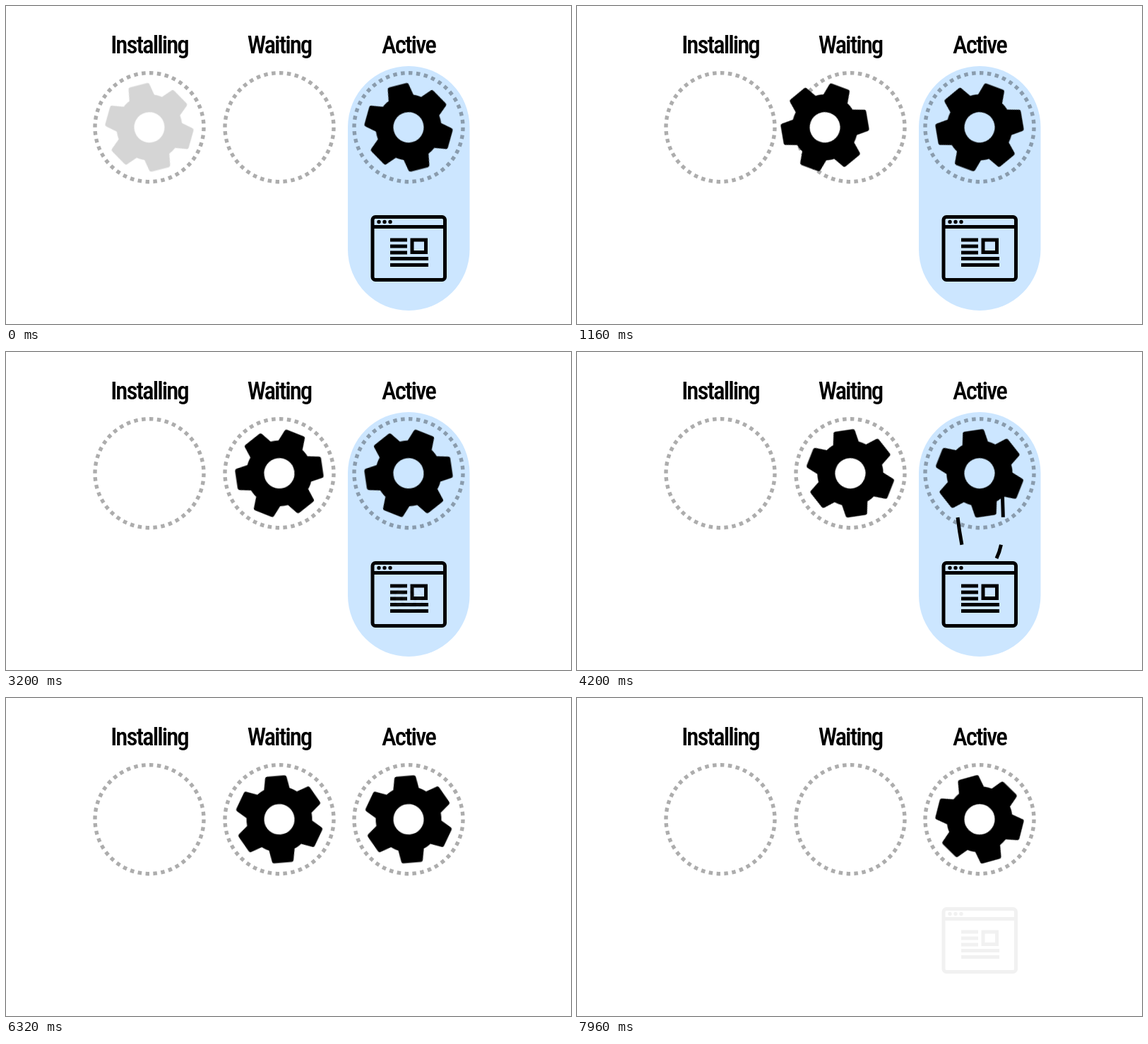
Animation, 800 px wide and 450 px high, one loop 8000 ms. Source, as an HTML page:

```html
<!DOCTYPE html>
<html lang="en">
<head>
<meta charset="utf-8">
<title>Worker lifecycle</title>
<style>
  html, body { margin: 0; width: 100%; height: 100%; overflow: hidden; background: #fff; }
  svg { display: block; width: 100vw; height: 100vh; }
  .label {
    font: 500 35px 'Roboto Condensed', 'Open Sans Condensed', Roboto, sans-serif;
    font-stretch: condensed;
    letter-spacing: -2px;
    text-anchor: middle;
  }
  .slot { fill: none; stroke: #000; stroke-opacity: .32; stroke-width: 5.4; stroke-dasharray: 1; }
  .line { fill: none; stroke: #000; stroke-width: 5; }
</style>
</head>
<body>
<svg viewBox="0 0 800 450">
  <defs>
    <path id="tooth" d="M-16 -38L-12.3 -58.4H12.3L16 -38Z" stroke="#000" stroke-width="6" stroke-linejoin="round"/>
    <g id="gear"><circle r="34" fill="none" stroke="#000" stroke-width="25"/></g>
    <circle id="slot" class="slot" r="77" pathLength="88"/>
  </defs>

  <rect id="pill" x="484" y="85" width="172.5" height="346" rx="86.25" fill="#cce6ff"/>

  <g id="columns"></g>

  <path id="fetch" class="line" d="M549 292Q536 236 535 172A35 35 0 0 1 605 172C597 205 612 255 594 292"/>

  <g id="page">
    <g id="pageArt" class="line">
      <rect x="519" y="298.5" width="102.5" height="89" rx="4"/>
      <path d="M519 312.5H621"/>
      <path d="M544 331H568M544 340H568M544 349H568M544 357.5H598M544 366.5H598"/>
      <rect x="575" y="331" width="19.5" height="17.5"/>
      <g fill="#000" stroke="none">
        <circle cx="528" cy="305.5" r="2.7"/>
        <circle cx="536" cy="305.5" r="2.7"/>
        <circle cx="544" cy="305.5" r="2.7"/>
      </g>
    </g>
    <g id="reload">
      <circle cx="570" cy="349" r="19.6" fill="#fff" stroke="#000" stroke-width="2.6"/>
      <path d="M566 358.5A10 10 0 1 1 577.5 355.5" fill="none" stroke="#000" stroke-width="3.4"/>
      <path d="M570.5 361.5L581 362L580.5 351Z"/>
    </g>
  </g>

  <g id="oldWorker"><use class="spin" href="#gear"/></g>
  <g id="newWorker"><use class="spin" href="#gear"/></g>
</svg>
<script>
const LOOP = 8000;
const SLOTS = { Installing: 203, Waiting: 387, Active: 570 };
const ROW = 171.7;
const $ = id => document.getElementById(id);

function add(parent, tag, attrs, text = '') {
  const el = document.createElementNS('http://www.w3.org/2000/svg', tag);
  for (const name in attrs) el.setAttribute(name, attrs[name]);
  el.textContent = text;
  return parent.appendChild(el);
}

// Each step is [ms, value, easing towards the next step].
function play(el, property, steps) {
  const first = steps[0], last = steps[steps.length - 1];
  const all = [[0, first[1]], ...steps, [LOOP, last[1]]];
  const frames = all.map(([ms, value, easing = 'linear']) =>
    ({ offset: ms / LOOP, [property]: value, easing }));
  el.animate(frames, { duration: LOOP, iterations: Infinity }).startTime = 0;
}

const at = x => `translate(${x}px, ${ROW}px)`;

for (let i = 0; i < 6; i++) add($('gear'), 'use', { href: '#tooth', transform: `rotate(${i * 60})` });

for (const [name, x] of Object.entries(SLOTS)) {
  add($('columns'), 'text', { class: 'label', x, y: 67 }, name);
  add($('columns'), 'use', { href: '#slot', x, y: ROW });
}

for (const gear of document.querySelectorAll('.spin')) {
  play(gear, 'transform', [[0, 'rotate(-14.4deg)'], [LOOP, 'rotate(225.6deg)']]);
}

play($('newWorker'), 'opacity', [[0, .165], [415, 1]]);
play($('newWorker'), 'transform', [
  [910, at(SLOTS.Installing), 'ease'], [1410, at(SLOTS.Waiting)],
  [6860, at(SLOTS.Waiting), 'ease'], [7360, at(SLOTS.Active)]
]);

$('oldWorker').style.transform = at(SLOTS.Active);
play($('oldWorker'), 'opacity', [[6410, 1], [6810, 0]]);

play($('page'), 'opacity', [[5860, 1], [6260, 0], [7930, 0], [LOOP, .13]]);
play($('pill'), 'opacity', [[5900, 1], [6260, 0]]);

play($('pageArt'), 'opacity', [[1910, 1], [2210, .25], [2910, .25], [3210, 1]]);
play($('reload'), 'opacity', [[1910, 0], [2210, 1], [2910, 1], [3210, 0]]);

// A train of five dashes runs up to the worker and back down to the page.
$('fetch').style.strokeDasharray = '39 39 39 39 39 39 39 39 39 999';
play($('fetch'), 'strokeDashoffset', [[3337, '360px'], [5000, '-371px']]);
</script>
</body>
</html>
```
